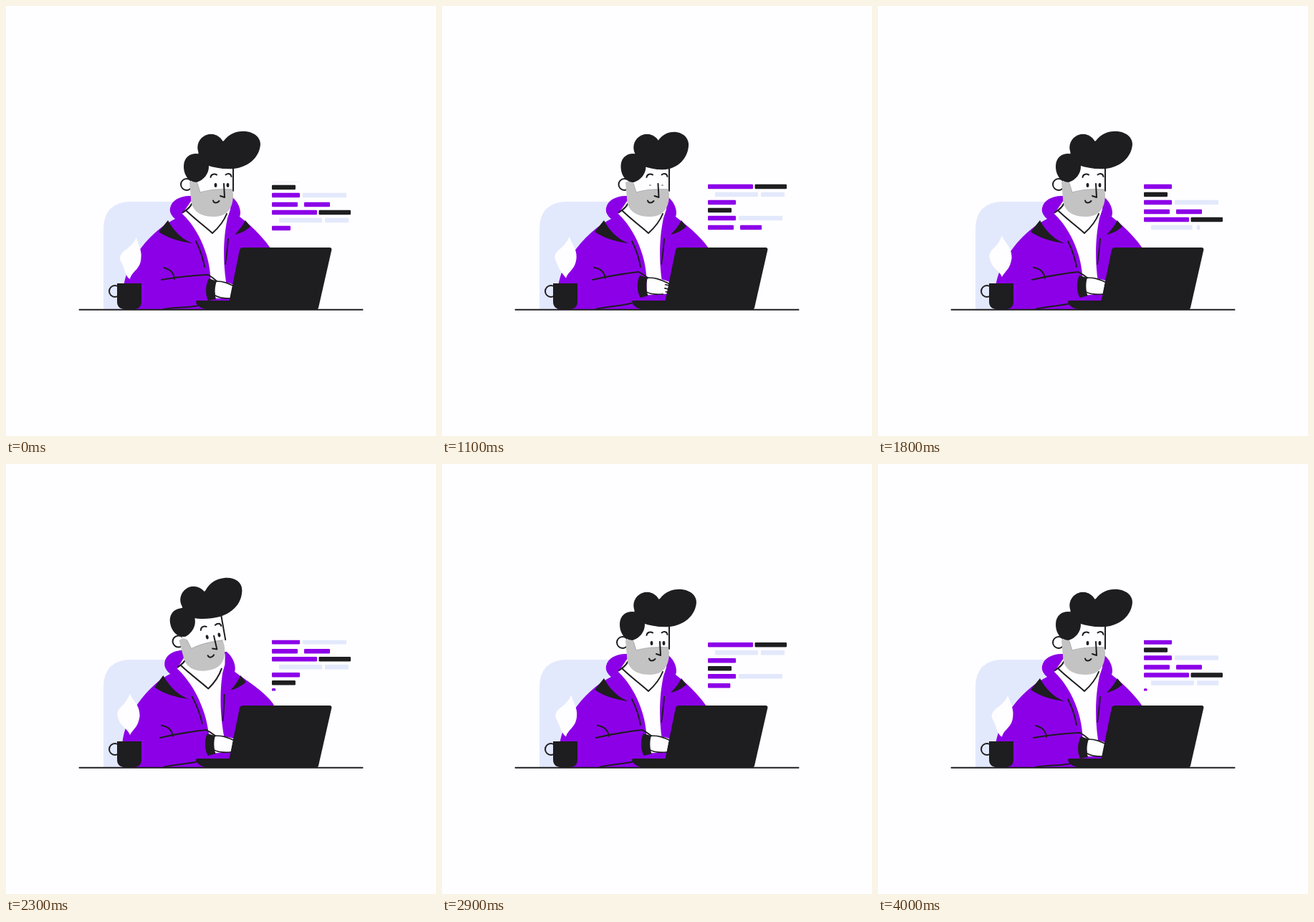
An HTML page for the animation above (4100 ms loop, 600 px wide and 600 px high).

```html
<!DOCTYPE html>
<html lang="en">
<head>
<meta charset="utf-8">
<title>Coding at the desk</title>
<style>
  html, body { margin: 0; width: 100%; height: 100%; overflow: hidden; background: #fefdff; }
  svg { display: block; width: 100vw; height: 100vh; }
  .ink { fill: #1e1d20; }
  .violet { fill: #8c00e8; }
  .pale { fill: #e3e9fc; }
  .white { fill: #fefdff; }
  .beard { fill: #c3c3c3; }
  .line { fill: none; stroke: #1e1d20; stroke-width: 2; stroke-linecap: round; stroke-linejoin: round; }
</style>
</head>
<body>
<svg viewBox="0 0 600 600">
  <defs><clipPath id="codeClip"><rect x="360" y="245.7" width="140" height="70.8"/></clipPath></defs>

  <path class="pale" d="M136 424V312Q136 273 175 273H280V424Z"/>

  <g id="torso">
    <path id="coat" class="violet"/>
    <path class="white" d="M259 271L246 290C262 305 273 326 279 345C284 360 286 375 286 400H314L307 385C302 350 304 320 309 296L313 284L314 270Z"/>
    <path class="line" d="M259 276C258 280 254 283 247 288M251 285C263 297 277 307 288 317C297 309 304 300 308 290"/>
    <path class="ink" d="M226 299C235 316 247 326 260 331C243 329 226 324 213 315Z"/>
    <path class="ink" d="M334 299L341 308C335 313 328 317 319 319C325 313 330 307 334 299Z"/>
    <path class="line" d="M265 328C271 340 275 352 277 364M310 325C309 337 308 349 306 360"/>
  </g>

  <g id="arm">
    <path class="violet" d="M217 382C240 378 262 377 284 375L290 411H217Z"/>
    <path class="white" d="M293 384C303 384 312 386 325 392V408H291Z"/>
    <path class="line" style="stroke-width:1.6" d="M293 384C303 384 310 386 325 395M292 404C298 408 306 408 314 408M318 395L325 397M317 400L324 402M318 405L325 407"/>
    <path class="line" d="M220 365C231 368 234 373 235 381M217 382C240 378 262 376 282 375C287 378 291 381 294 384"/>
    <path class="ink" d="M283 380L294 384C291 392 291 401 293 409L282 411C277 400 279 388 283 380Z"/>
    <path class="line" d="M220 423C238 420 254 421 269 418"/>
  </g>

  <g id="head">
    <g id="ear">
      <circle class="white" cx="252" cy="249" r="8"/>
      <circle class="line" cx="252" cy="249" r="8"/>
    </g>
    <path class="white" d="M257 238L283 220L317 220V262L300 285L262 275Z"/>
    <path class="line" d="M317 220V258"/>
    <g id="jaw">
      <path class="beard" d="M256 246C261 243 265 244 267 247L271 260C284 256 300 255 316 256L317 263C317 283 308 294 290 294C268 294 258 283 258 268Z"/>
      <path class="line" style="stroke:#999;stroke-width:.7" d="M267 247L271 260C284 256 300 255 316 256"/>
    </g>
    <path id="mouth" class="line" d="M289 271.500C290 275 294 276 297.500 272"/>
    <path id="nose" class="line" d="M304 248L305 267L299 265"/>
    <ellipse id="eyeL" class="ink" cx="292.500" cy="250" rx="1.900"/>
    <ellipse id="eyeR" class="ink" cx="309.500" cy="250" rx="1.900"/>
    <path class="line" d="M285.500 239C286 235 290 233.500 294 235.500M306.500 235.500C310 233 314 234 314.500 238"/>
    <g id="hair" class="ink">
      <path id="lobe" d="M268 205L304 188C312 178 322 174 335 175C350 177 358 187 354 199C350 215 335 225 318 227C304 228 291 226 280 222Z"/>
      <circle cx="286" cy="197.500" r="18.700"/>
      <path id="bun" d="M265 206C276 206 283 213 283 224C283 234 276 243 266 246C255 246 248 236 248 224C248 213 255 206 265 206Z"/>
    </g>
  </g>

  <path class="ink" d="M267 411H314V424H284C274 423 266 419 265 413Q265 411 267 411Z"/>
  <path class="ink" d="M331 337H451.500Q455 337 454.300 340.500L436 421Q435 424 432 424H309L326 340Q327 337 331 337Z"/>

  <path id="steam" class="white"/>
  <circle class="line" cx="152" cy="398" r="8"/>
  <path class="ink" d="M155 387H189V412Q189 423 178 423H166Q155 423 155 412Z"/>
  <path class="line" d="M102.500 423.700H497.500"/>

  <g id="code" clip-path="url(#codeClip)"></g>
</svg>
<script>
const LOOP = 4100, CYCLE = LOOP / 2, ROW_H = 11, BLOCK_H = 68, TYPE_MS = 250;
const $ = id => document.getElementById(id);
const clamp = x => Math.max(0, Math.min(1, x));
const ease = x => x * x * (3 - 2 * x);
const set = (id, name, value) => $(id).setAttribute(name, value);
const move = (id, x, y) => set(id, "transform", `translate(${x} ${y})`);
const ramp = (t, from, to) => ease(clamp((t - from) / (to - from)));
// Rises from a to b, holds, falls from c to d
const pulse = (t, a, b, c, d) => ramp(t, a, b) - ramp(t, c, d);

// Each bar: row, x, width, colour
const BARS = [
  [0, 371, 39, "violet"],
  [1, 371, 33, "ink"],
  [2, 371, 39, "violet"], [2, 414, 61, "pale"],
  [3, 371, 36, "violet"], [3, 416, 36, "violet"],
  [4, 371, 63, "violet"], [4, 436.5, 44.5, "ink"],
  [5, 381, 60, "pale"], [5, 445, 33, "pale"]
];
const rowY = row => row * ROW_H + (row > 2 ? 2 : 0);

// Bars start evenly, with a slow swing in the typing pace
const startOf = i => CYCLE * i / BARS.length + 18 + 85 * Math.sin(Math.PI * (i - 4.6) / 5);
const rowStart = BARS.map((bar, i) => i && BARS[i - 1][0] === bar[0] ? null : startOf(i))
  .filter(time => time !== null);

// Two copies of the block: the one being typed and the one above it
const bars = [0, 1].flatMap(back => BARS.map(([row, x, width, colour], i) => {
  const el = document.createElementNS("http://www.w3.org/2000/svg", "rect");
  const attrs = { class: colour, x, height: 6.5, rx: 1.3 };
  for (const name in attrs) el.setAttribute(name, attrs[name]);
  $("code").append(el);
  return { el, width, y: 305.75 + rowY(row) - back * BLOCK_H, start: startOf(i) - back * CYCLE };
}));

function drawCode(t) {
  const v = (t + 150) % CYCLE;
  let scroll = rowY(5) - BLOCK_H;
  rowStart.forEach((time, row) => {
    const step = row ? rowY(row) - rowY(row - 1) : ROW_H;
    scroll += step * ramp(v, time - 45, time + 215);
  });
  for (const { el, width, y, start } of bars) {
    el.setAttribute("width", width * ramp(v, start, start + TYPE_MS));
    el.setAttribute("y", y - scroll);
  }
}

function drawSteam(t) {
  const s = Math.max(-1, 1.3 * Math.cos(6 * Math.PI * t / LOOP) - .3);
  const tip = `${177 + 5 * s} ${321.5 + 1.5 * s}`;
  set("steam", "d", `M${tip}C${180 + 4 * s} 331 ${188 + 2 * s} ${338 + 4 * s} ${187.5 + s} 351` +
    `C${186 + 2 * s} 368 ${177 - s} 369 173 ${379.5 + 1.5 * s}` +
    `C${167.5 - 1.5 * s} ${372 + 6 * s} ${162 + 5 * s} 367 ${157 + 2 * s} ${351.5 + 2.5 * s}` +
    `C${157 + 2 * s} 339 ${169.5 + 3.5 * s} ${340 + 2 * s} ${tip}Z`);
}

function drawBody(t, lift, nod) {
  const sx = .054 * lift, sy = .033 * lift;
  set("torso", "transform", `matrix(1 0 ${sx} ${1 + sy} ${-424 * sx} ${-424 * sy})`);
  const l = -2 * nod, r = 3 * nod + 9 * lift;
  set("coat", "d", `M${163 + l} 424C${161 + l} 395 ${166 + l} 378 ${172 + l} 365C181 345 195 327 213 312` +
    `C220 306 228 301 236 297C230 292 228 287 229 282C231 271 243 265 257 265L300 270L316 267` +
    `C325 274 329 287 326 294C340 305 ${356 + r} 319 ${369 + r} 338L385 424Z`);
  const raise = pulse(t, 500, 1000, 2950, 3900);
  set("arm", "transform", `translate(${-2 * raise - 5 * nod} 0) rotate(${-3.5 * raise} 217 382)`);
}

function drawHead(t, lift, nod) {
  set("head", "transform", `translate(${-12 * lift} ${-10 * lift}) rotate(${-10 * lift} 301 250)`);
  move("hair", -3 * lift, -2 * lift);
  move("jaw", -3 * lift, 2 * lift);
  move("nose", -2 * lift - 2.5 * nod, 2 * lift);
  move("mouth", -2 * nod, 4 * lift);
  move("ear", 2.5 * nod, 0);
  move("bun", 1.5 * nod, 0);
  const s = 1 - .15 * nod;
  set("lobe", "transform", `matrix(${s} 0 0 1 ${283 * (1 - s)} ${nod})`);
  const lid = 1 - .85 * pulse(t, 950, 1060, 1140, 1280);
  for (const id of ["eyeL", "eyeR"]) {
    set(id, "ry", 3 * lid);
    move(id, -2 * nod, 0);
  }
}

function draw(t) {
  const lift = 1.04 * pulse(t, 1800, 2150, 2250, 2650);
  const nod = pulse(t, 400, 950, 1180, 1550);
  drawBody(t, lift, nod);
  drawHead(t, lift, nod);
  drawSteam(t);
  drawCode(t);
}

const start = performance.now();
function tick(now) {
  // Ten poses a second
  const t = Math.max(0, now - start) % LOOP;
  draw(Math.floor(t / 100) * 100);
  requestAnimationFrame(tick);
}
draw(0);
requestAnimationFrame(tick);
</script>
</body>
</html>
```
